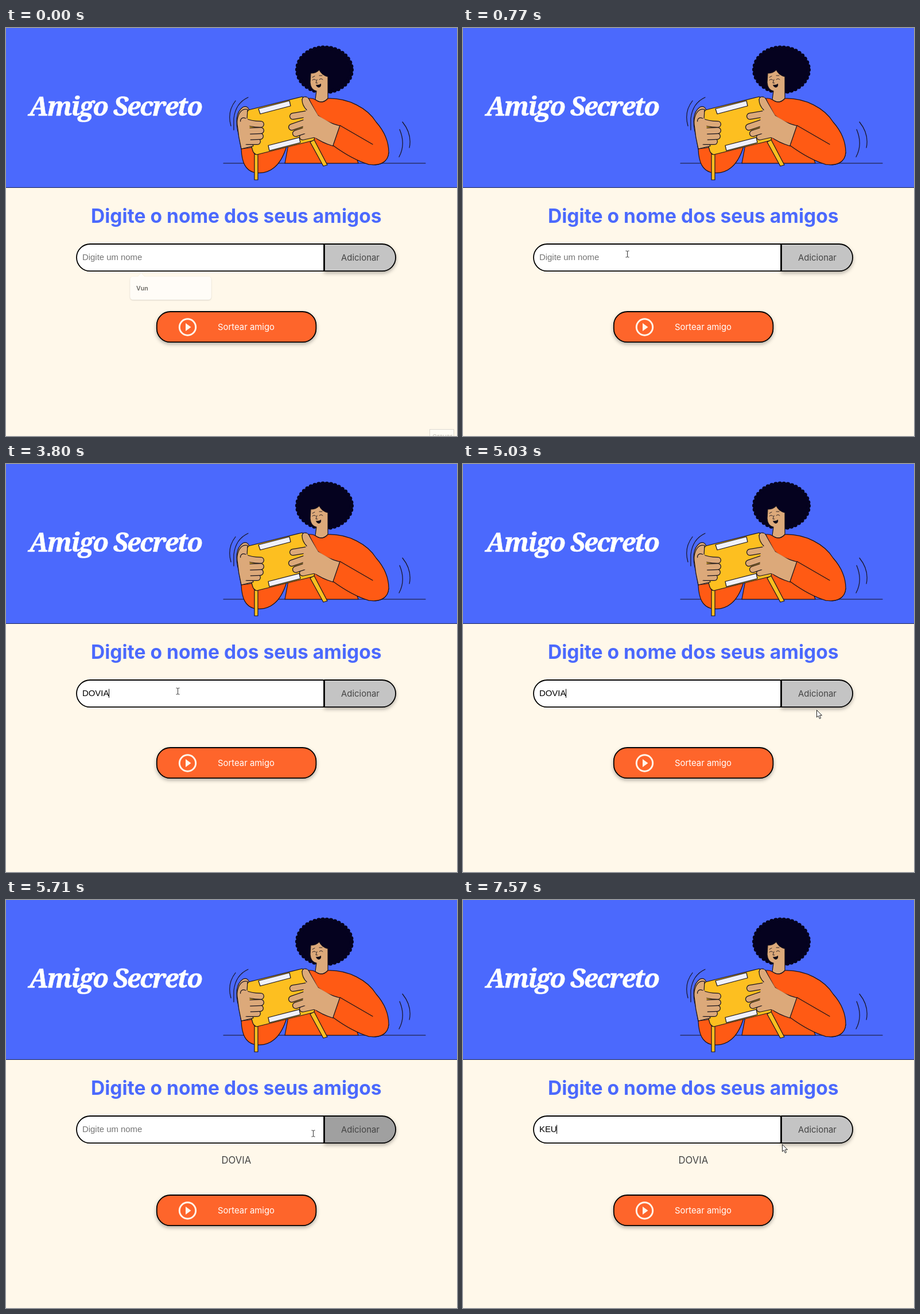
Animation of 786x712 px, one loop 8000 ms. Source, as an HTML page:

```html
<!DOCTYPE html>
<html lang="pt-BR">
<head>
<meta charset="utf-8">
<title>Amigo Secreto</title>
<style>
  html, body { margin: 0; width: 100%; height: 100%; overflow: hidden; background: #fff8ea; }
  svg { display: block; width: 100vw; height: 100vh; }
  text { font-family: Inter, sans-serif; font-optical-sizing: none; }
  .title { font: italic 700 45px "Noto Serif", serif; letter-spacing: -2.05px; fill: #fff; stroke: #fff; stroke-width: .6; }
  .heading { font-size: 33.55px; font-weight: 700; fill: #4b69fd; }
  .label { font-size: 14.9px; fill: #444; }
  .field { font: 14.9px "Liberation Sans", Arial, sans-serif; }
  .box { stroke: #000; stroke-width: 1.8; }
  .raised { filter: drop-shadow(0 3px 3px rgba(0, 0, 0, .3)); }
  .ink { stroke: #17121c; stroke-width: 1.2; stroke-linejoin: round; stroke-linecap: round; }
  .skin { fill: #dca97a; }
  .shirt { fill: #ff5a14; }
  .wood { fill: #fdbf20; }
  .line { fill: none; }
  .finger { fill: none; stroke-linecap: round; }
</style>
</head>
<body>
<svg viewBox="0 0 786 712" preserveAspectRatio="none">
  <rect width="786" height="712" fill="#fff8ea"/>
  <rect width="786" height="278" fill="#4b69fd"/>
  <path d="M0 278.5H786" stroke="#172258"/>
  <text class="title" x="40" y="153">Amigo Secreto</text>

  <g class="ink">
    <path class="line" d="M379 236H731M400 127Q385 146 392 171M422 121Q400 131 397 158V178
      M691 164Q708 185 703 209M686 177Q697 203 685 225"/>
    <!-- hair, face and neck -->
    <ellipse cx="555" cy="73" rx="47" ry="38.5" fill="#05021f" stroke="#05021f"/>
    <ellipse class="line" cx="555" cy="73" rx="47" ry="38.5" stroke="#05021f" style="stroke-width:8;stroke-dasharray:0 7.1"/>
    <path class="skin" d="M531 79Q540 79 546 73Q550 82 561 85V123Q552 134 539 125L541 110Q531 108 530 95Z"/>
    <path class="line" style="stroke-width:.9" d="M534 91Q537 88 540 91M546 90Q549 87 552 90M534 86L538 84M546 83L551 83M542 90L540 96H543"/>
    <path d="M540 99Q545 100 549 97Q550 103 545 104Q541 103 540 99Z" fill="#120d18" stroke="none"/>
    <!-- torso and sleeves -->
    <path class="shirt" d="M527 123Q534 122 539 125Q551 134 561 123C597 122 630 140 645 164C660 181 667 198 667 217
      C666 235 650 241 632 238L612 230L614 236H486L492 204Z"/>
    <path class="shirt" d="M410 211C411 236 418 248 432 252C460 257 480 240 490 203L432 200Z"/>
    <!-- held box -->
    <path class="skin" d="M424 143Q421 135 413 138C400 147 400 166 405 184L410 211L432 208Z"/>
    <path class="wood" d="M433 220H439V265H433ZM530 199L537 195L560 239L553 241Z"/>
    <path class="wood" d="M423 143L516 120Q526 121 528 132L537 190Q539 196 533 197L437 221Q431 220 429 211L418 159Q418 147 423 143Z"/>
    <path d="M440 141L494 127L496 136L443 150ZM457 205L511 191L513 200L459 214Z" fill="#f0f1fa"/>
    <!-- left hand -->
    <path class="skin" d="M421 142C408 139 402 155 403 168Q405 190 410 211L431 206Q428 197 424 188L420 160Z"/>
    <g id="leftFingers"></g>
    <path class="skin" stroke="none" d="M406 165L420 157L424 164L426 198L411 207Q405 187 406 165Z"/>
    <!-- right hand and forearm -->
    <g id="rightFingers"></g>
    <path class="skin" d="M516 125C517 117 527 119 530 128L543 152Q556 164 583 171L570 206Q550 200 537 190"/>
    <path class="skin" stroke="none" d="M516 126L525 121L544 153L575 171L568 203L535 190L517 183L519 149L524 144Z"/>
    <path class="line" d="M516 125Q516 135 524 143"/>
    <path class="shirt" d="M582 170L570 205C592 221 615 233 632 238C650 241 666 235 667 217L639 196Z" stroke="none"/>
    <path class="line" d="M639 203L582 170L570 205C592 221 615 233 632 238C650 241 666 235 667 217"/>
  </g>

  <text class="heading" x="401.3" y="340" text-anchor="middle">Digite o nome dos seus amigos</text>

  <path id="add" class="box raised" d="M555 377H655.5A23.6 23.6 0 0 1 655.5 424.2H555Z"/>
  <path id="input" class="box" fill="#fff"/>
  <text class="label" x="617.5" y="406" text-anchor="middle">Adicionar</text>
  <text id="value" class="field" x="133" y="405"></text>
  <path id="caret" stroke="#000" d="M0 392.5V408"/>

  <text id="friend" x="401.3" y="460" text-anchor="middle" font-size="16.7" fill="#444">DOVIA</text>
  <g id="draw">
    <rect class="box raised" x="262.8" y="495" width="277.6" height="53.2" rx="23.5" fill="#fe652b"/>
    <circle cx="316.5" cy="522" r="14.2" fill="none" stroke="#fff5ea" stroke-width="3"/>
    <path d="M313 515L322.5 522L313 529Z" fill="#fff5ea"/>
    <text class="label" x="418.5" y="527.3" text-anchor="middle" style="fill:#fff">Sortear amigo</text>
  </g>

  <g id="popup">
    <path d="M220 433H228L234 427L240 433H354Q360 433 360 439V469Q360 475 354 475H220Q214 475 214 469V439Q214 433 220 433Z"
      fill="#fff" style="filter:drop-shadow(0 1px 1px rgba(0,0,0,.25))"/>
    <text x="225" y="458.5" font-size="11" font-weight="600" fill="#111">Vun</text>
  </g>
  <g id="tooltip">
    <rect x="738.5" y="700.5" width="42" height="20" fill="#fffcf5" stroke="#ddd9d0"/>
    <text x="743" y="717" font-size="11" fill="#c4c0b8">Gravar</text>
  </g>

  <g id="cursor">
    <path id="ibeam" fill="none" stroke="#333" d="M-3 -5.5H-1L0 -4.5L1 -5.5H3M0 -5V5M-3 5.5H-1L0 4.5L1 5.5H3"/>
    <path id="arrow" fill="#fff" stroke="#222" d="M0 0V12.5L2.8 10L5 15L7 14L5 9.2H9Z"/>
    <path id="hand" fill="#fff" stroke="#222" d="M-1 1Q0 -1 1.5 1V6L8 8Q10 9 9 12L8 17H1L-4 11Q-5 8 -1 10Z"/>
  </g>
</svg>
<script>
const LOOP = 8000, BLINK = 530, FADE = 160;
const $ = id => document.getElementById(id);
const clamp = v => Math.max(0, Math.min(1, v));
const ramp = (t, start, length) => clamp((t - start) / length);
const show = (id, on) => $(id).setAttribute("visibility", on ? "visible" : "hidden");

// Each finger is a round stroke over a slightly wider dark one.
function drawFingers(id, paths) {
  $(id).innerHTML = paths.map(d =>
    `<path class="finger" d="${d}" style="stroke-width:12"/>` +
    `<path class="finger" d="${d}" style="stroke:#dca97a;stroke-width:9.6"/>`).join("");
}
drawFingers("leftFingers", ["M420 198L438 198", "M418 190L443 189", "M417 180L444 179", "M414 162Q426 168 444 168"]);
drawFingers("rightFingers", ["M540 185L517 190", "M535 174L505 184", "M530 162L498 173", "M530 149L500 154"]);

// Times of focus, typing and popups
const focusSpans = [[900, 5400], [5910, LOOP]];
const popupSpans = [[-2000, -60], [920, 3090], [5930, 7100]];
const words = [
  { text: "DOVIA", keys: [3090, 3280, 3540, 3670, 3800], cleared: 5500 },
  { text: "KEU", keys: [7100, 7340, 7570], cleared: LOOP }
];
const track = [
  [70, 752, 712], [300, 622, 545], [520, 410, 445], [770, 286, 394], [900, 286, 394],
  [1230, 299, 396], [4330, 299, 396], [4600, 389, 491], [4820, 389, 491], [5030, 616, 429],
  [5170, 619, 404], [5640, 619, 404], [5710, 535, 407], [5910, 530, 408], [6240, 556, 426]
];

function cursorAt(t) {
  const next = track.findIndex(p => p[0] > t);
  if (next < 0) return track[track.length - 1].slice(1);
  if (next === 0) return [900, 800];
  const [t0, x0, y0] = track[next - 1], [t1, x1, y1] = track[next];
  const k = (t - t0) / (t1 - t0);
  return [x0 + (x1 - x0) * k, y0 + (y1 - y0) * k];
}

function typedAt(t) {
  for (const { text, keys, cleared } of words)
    if (t >= keys[0] && t < cleared) return text.slice(0, keys.filter(k => k <= t).length);
  return "";
}

function render(t) {
  const focus = focusSpans.find(([a, b]) => t >= a && t < b);
  const typed = typedAt(t);
  const value = $("value");
  value.textContent = typed || "Digite um nome";
  value.setAttribute("fill", typed ? "#000" : "#757575");
  const rightSide = focus ? "H552Q554 377 554 379V422.2Q554 424.2 552 424.2" : "H554V424.2";
  $("input").setAttribute("d", `M146.6 377${rightSide}H146.6A23.6 23.6 0 0 1 146.6 377Z`);

  let blinkOn = false;
  if (focus) {
    const keys = words.flatMap(w => w.keys).filter(k => k <= t && k >= focus[0]);
    blinkOn = Math.floor((t - Math.max(focus[0], ...keys)) / BLINK) % 2 === 0;
  }
  show("caret", blinkOn);
  const caretX = 133 + (typed ? value.getComputedTextLength() : 0);
  $("caret").setAttribute("transform", `translate(${Math.floor(caretX) + 0.5})`);

  const hover = ramp(t, 5140, 300) - ramp(t, 5710, 300);
  const grey = Math.round(196 - 36 * hover);
  $("add").setAttribute("fill", `rgb(${grey},${grey},${grey})`);

  const added = t >= 5500;
  show("friend", added);
  $("draw").setAttribute("transform", `translate(0 ${added ? 20 : 0})`);

  const open = Math.max(...popupSpans.map(([a, b]) => Math.min(ramp(t, a, FADE), 1 - ramp(t, b, FADE))));
  $("popup").setAttribute("opacity", open);
  $("popup").setAttribute("transform", `translate(287 454) scale(${0.92 + 0.08 * open}) translate(-287 -454)`);
  show("tooltip", t < 70);

  const [x, y] = cursorAt(t);
  const inRow = y > 376 && y < 425 && x > 122 && x < 680;
  $("cursor").setAttribute("transform", `translate(${Math.round(x) + 0.5} ${Math.round(y) + 0.5})`);
  show("ibeam", inRow && x < 554);
  show("hand", inRow && x >= 554);
  show("arrow", !inRow);
}

const start = performance.now();
function frame() {
  render((performance.now() - start) % LOOP);
  requestAnimationFrame(frame);
}
frame();
</script>
</body>
</html>
```
